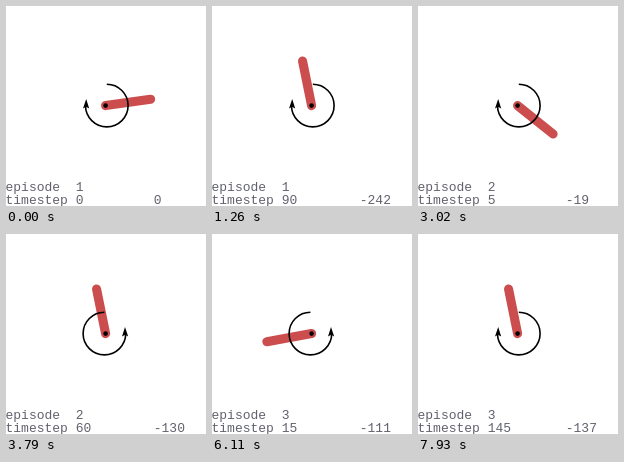
An HTML page that plays this animation: 200x200 px, repeating every 8000 ms.

```html
<!DOCTYPE html>
<html lang="en">
<head>
<meta charset="utf-8">
<title>Pendulum swing-up</title>
<style>
  html, body { margin: 0; width: 100%; height: 100%; overflow: hidden; background: #fff; }
  svg { display: block; width: 100vw; height: 100vh; }
  text { font: 13px "Liberation Mono", "Courier New", monospace; fill: #62626e; white-space: pre; }
</style>
</head>
<body>
<svg viewBox="0 0 200 200">
  <g transform="translate(99.6 99.6)">
    <line id="rod" y2="-45.45" stroke="#cc4d4d" stroke-width="9.1" stroke-linecap="round"/>
    <circle r="2.3"/>
    <g id="arrow">
      <path d="M1.2 -21.3A21.3 21.3 0 1 1 -20.1 0" fill="none" stroke="#000" stroke-width="1.6"/>
      <path d="M-19.4 -6.6L-16.4 3L-19.6 1.2L-22.6 3Z"/>
    </g>
  </g>
  <text id="top" x="-0.5" y="185"></text>
  <text id="bottom" x="-0.5" y="198"></text>
</svg>
<script>
const LOOP = 8000, EPISODE = 2950, TICK = 70, LAST = 39;
const PUSH = 3;      // tick at which the swing torque reverses
const REST = 0.2;    // lean to the left when balanced, in radians
const DRIFT = 0.27;  // penalty per tick while leaning
const TURN = 2 * Math.PI;

// path: [tick, clockwise angle from upright]; cost: penalty of the swing-up
const episodes = [
  { path: [[0, 1.43], [4, 4.85], [9.5, -REST]], cost: 237.2 },
  { path: [[0, 1.84], [5, TURN - REST]], cost: 127.1 },
  { path: [[0, 1.6], [5, TURN - REST]], cost: 129.6 }
];

const $ = id => document.getElementById(id);
const ease = x => (1 - Math.cos(Math.PI * Math.min(1, x))) / 2;

function angleAt(path, i) {
  let angle = path[0][1];
  for (let k = 1; k < path.length; k++) {
    const [t0, a0] = path[k - 1], [t1, a1] = path[k];
    if (i >= t0) angle = a0 + (a1 - a0) * ease((i - t0) / (t1 - t0));
  }
  return angle;
}

// while balancing, two ticks in seven push counter-clockwise
function isCounter(n, i, end) {
  return i < end ? i >= PUSH : (3 * i + 2 * n + 4) % 7 < 2;
}

function draw(ms) {
  const t = ms % LOOP;
  const n = Math.floor(t / EPISODE);
  const i = Math.min(LAST, Math.floor((t - n * EPISODE) / TICK + 1e-6));
  const { path, cost } = episodes[n];
  const end = path[path.length - 1][0];
  const score = Math.round(cost * ease(i / (end - 1)) + DRIFT * i);
  $("rod").setAttribute("transform", `rotate(${angleAt(path, i) * 360 / TURN})`);
  $("arrow").setAttribute("transform", isCounter(n, i, end) ? "scale(-1 1)" : "");
  $("top").textContent = `episode  ${n + 1}`;
  $("bottom").textContent = `timestep ${i * 5}`.padEnd(19) + (score ? -score : 0);
}

const start = performance.now();
function loop() {
  draw(performance.now() - start);
  requestAnimationFrame(loop);
}
loop();
</script>
</body>
</html>
```
